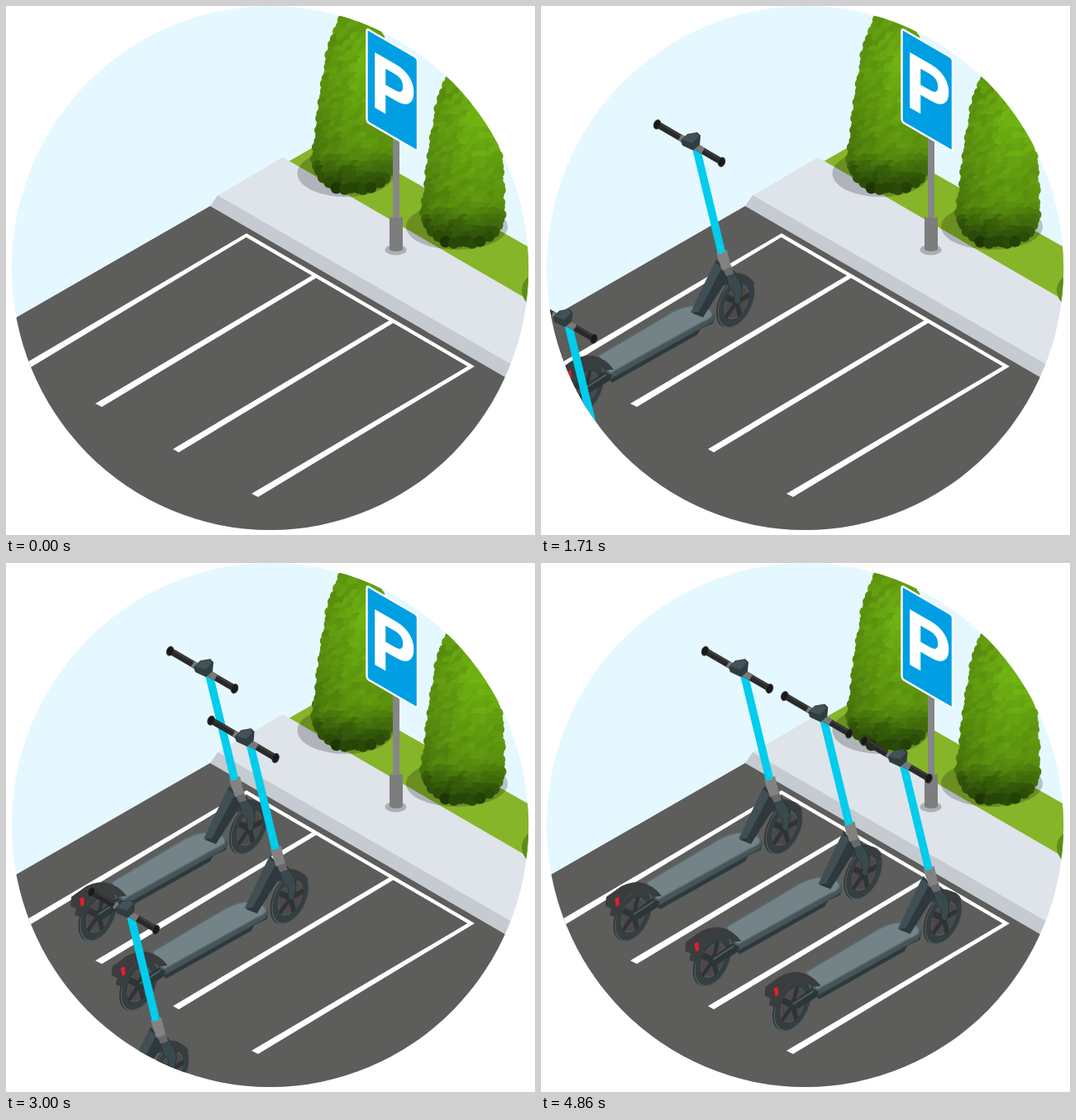
An HTML page for the animation above (7210 ms loop, 640 by 640 pixels).

```html
<!DOCTYPE html>
<html lang="en">
<head>
<meta charset="utf-8">
<title>Scooter parking</title>
<style>
  html, body { margin: 0; width: 100%; height: 100%; overflow: hidden; background: #fff; }
  svg { display: block; width: 100%; height: 100%; }
  text { font: bold 95px "Liberation Sans", Arial, sans-serif; }
</style>
</head>
<body>
<svg viewBox="0 0 640 640">
  <defs>
    <clipPath id="round"><ellipse cx="319.5" cy="317" rx="312.7" ry="317"/></clipPath>

    <g id="tree"></g>

    <g id="wheel">
      <circle cx="-3" cy="-1" r="28.5" fill="#303536"/>
      <circle r="23.500" fill="#4d4746" stroke="#373e40" stroke-width="11"/>
      <circle r="28.5" fill="none" stroke="#506065" stroke-width="1.4"/>
      <circle r="18.500" fill="none" stroke="#4b5a5e" stroke-width="1.5"/>
      <g id="spokes" stroke="#2c3436" stroke-width="6.500"></g>
      <circle r="6.5" fill="#2c3436"/>
    </g>

    <g id="scooter">
      <!-- deck -->
      <path fill="#2d3a3d" d="M132 394L228 336L268 338L266 347L251 354L247 361L144 419L136 411Z"/>
      <path fill="#455558" d="M131 390L228 332L266 334Q270 340 264 346L143 414Q136 410 131 390Z"/>
      <path fill="#748387" stroke="#5a6b70" stroke-width="1.5" d="M128 386L216 334Q236 323 254 327Q268 332 264 339Q260 343 252 346L142 407Q135 403 128 386Z"/>

      <!-- front wheel, fork and brace -->
      <use href="#wheel" transform="matrix(.78 -.45 0 1 294.5 321)"/>
      <path fill="#383c3d" d="M276 293L288 286Q305 284 316 298L311 304Q301 295 292 297L279 302Z"/>
      <path fill="#2d393c" d="M270 270L283 284L285 291L254 340L241 335Z"/>
      <path fill="#3f4f53" d="M268 273L277 280L249 333L239 334Z"/>
      <path fill="#3a494d" stroke="#2b3538" d="M281 286L291 283L294 290Q301 297 301 308L299 322Q295 326 292 321L292 309L286 304Z"/>
      <path fill="#696969" d="M277 280L288 277L291 287L282 290Z"/>
      <path fill="#828282" d="M270 262L283 258L288 279L277 283Z"/>

      <!-- rear wheel, arm and fender -->
      <use href="#wheel" transform="matrix(.78 -.45 0 1 112 426)"/>
      <path fill="#3a3c3d" d="M79 404L93 394Q103 386 119 386Q136 389 146 403L136 404Q119 391 106 402Q96 412 92 429L83 426L85 418L78 415Z"/>
      <path fill="#2b3639" d="M109 429Q108 423 115 420L134 406L144 410L140 417L119 430Q112 435 109 429Z"/>
      <path fill="none" stroke="#4d5d62" stroke-width="2" d="M112 425L137 409"/>
      <path fill="#e31e2d" d="M89 406L94 404L95 413L91 416Z"/>

      <!-- stem -->
      <path stroke="#00cdec" stroke-width="9.6" d="M246 136L275.8 259"/>
      <ellipse cx="275.8" cy="259.5" rx="4.9" ry="3.3" transform="rotate(-14 275.8 259.5)" fill="#00cdec"/>

      <!-- handlebar -->
      <path stroke="#292929" stroke-width="8" d="M199 106.5L277 152"/>
      <path stroke="#424242" stroke-width="1.5" d="M202 105.5L274 147.5"/>
      <path stroke="#787878" stroke-width="8" d="M226 122L254 138.5"/>
      <path fill="#303d40" d="M227 126L235 118L247 116L251 120L250 131L242 138L229 132Z"/>
      <path fill="#435257" d="M229 125L236 118.5L246 117L249 121L241 129Z"/>
      <g fill="#191919" stroke="#343434">
        <ellipse cx="198.5" cy="106.5" rx="4" ry="5.6" transform="rotate(20 198.5 106.5)"/>
        <ellipse cx="276.5" cy="152" rx="4" ry="5.6" transform="rotate(20 276.5 152)"/>
      </g>
    </g>
  </defs>

  <g clip-path="url(#round)">
    <path fill="#e6f8ff" d="M0 0H640V640H0Z"/>
    <path fill="#86b529" d="M335 192L396 157L640 296V365Z"/>
    <path fill="#dfe3ea" d="M255 230L335 183L640 360V452Z"/>
    <path fill="#c5cbd1" d="M247 242L256 229L640 450V471Z"/>
    <path fill="#5d5d5b" d="M0 384L247 242L640 470V640H0Z"/>
    <path fill="#fff" d="M0 446V455L292 279L291 275ZM108 481L116 485L377 328L372 325ZM202 536L209 540L471 382L466 379ZM297 590L305 594L567 436L560 435ZM291 275V280L561 437.5L567 436Z"/>
    <ellipse cx="648" cy="344" rx="24" ry="22" fill="#5d8d18"/>
    <g fill-opacity=".21">
      <ellipse cx="411" cy="202.5" rx="58.5" ry="28.5"/>
      <ellipse cx="545.5" cy="267" rx="61.5" ry="28"/>
    </g>
    <use href="#tree"/>
    <use href="#tree" x="132" y="65"/>

    <!-- sign -->
    <ellipse cx="471.5" cy="295" rx="13" ry="6.5" fill="#adb0b3"/>
    <path fill="#868686" d="M468 155H476V260H468Z"/>
    <path fill="#7d7d7d" d="M464 255Q472 258 480 255V295Q472 299 464 295Z"/>
    <path fill="#009fe3" stroke="#fff" stroke-width="2.4" stroke-linejoin="round" d="M436.5 30.5Q436.5 27.5 439 29L495 61.5Q498 63.5 498 66.5V172.5Q498 175.5 495 174L439 141.5Q436.5 139.5 436.5 136.500Z"/>
    <text fill="#fff" stroke="#fff" stroke-width="1.6" transform="matrix(.85 .49 0 1 441.4 119.6)">P</text>

    <use href="#scooter" class="ride"/>
    <use href="#scooter" class="ride"/>
    <use href="#scooter" class="ride"/>
  </g>
</svg>
<script>
const NS = "http://www.w3.org/2000/svg";
const $ = id => document.getElementById(id);

function add(parent, tag, attrs) {
  const el = document.createElementNS(NS, tag);
  for (const k in attrs) el.setAttribute(k, attrs[k]);
  parent.append(el);
}

let seed = 7;
const rand = () => (seed = seed * 16807 % 2147483647) / 2147483647 - .5;

// Rows of leaf blobs, lit from the upper right and dark at the foot
function growTree() {
  for (let y = -24; y <= 221; y += 7) {
    const up = 185 - y;
    const half = up > 0
      ? 52 - up / 10 - 13 * (up / 173) ** 6
      : 52 * Math.sqrt(1 - (up / 42) ** 2);
    const reach = Math.max(half - 7, 2), count = Math.ceil(reach / 4);
    for (let i = 0; i <= count; i++) {
      const x = 426 - y / 40 + reach * (2 * i / count - 1) + rand() * 3;
      const dark = Math.hypot((x - 445) / 85, (y - 80) / 150);
      const foot = Math.max(0, y - 180) / 40;
      add($("tree"), "circle", {
        cx: x.toFixed(1), cy: (y + rand() * 3).toFixed(1), r: 7,
        fill: `hsl(${85 + foot * 4} 82% ${39 - 12 * dark - 12 * foot + rand() * 4}%)`
      });
    }
  }
}

for (let i = 0; i < 5; i++)
  add($("spokes"), "path", { d: "M0 0V-20", transform: `rotate(${i * 72 + 20})` });
growTree();

// cubic-bezier(0, 0, .58, 1)
function easeOut(p) {
  let lo = 0, hi = 1;
  for (let i = 0; i < 24; i++) {
    const m = (lo + hi) / 2;
    if (1.74 * m * m - .74 * m ** 3 < p) lo = m; else hi = m;
  }
  return lo * lo * (3 - 2 * lo);
}

const LOOP = 7210, STEP = LOOP / 101, START = 78, RIDE = 2356, GAP = 1203;
const rides = document.querySelectorAll(".ride");

function draw() {
  const t = Math.floor((performance.now() % LOOP + 5) / STEP) * STEP;
  rides.forEach((el, i) => {
    const p = Math.min(1, Math.max(0, (t - START - i * GAP) / RIDE));
    const left = 432 * (1 - easeOut(p));
    el.setAttribute("transform", `translate(${i * 96.3 - left} ${i * 54.4 + left * .635})`);
  });
  requestAnimationFrame(draw);
}
draw();
</script>
</body>
</html>
```
